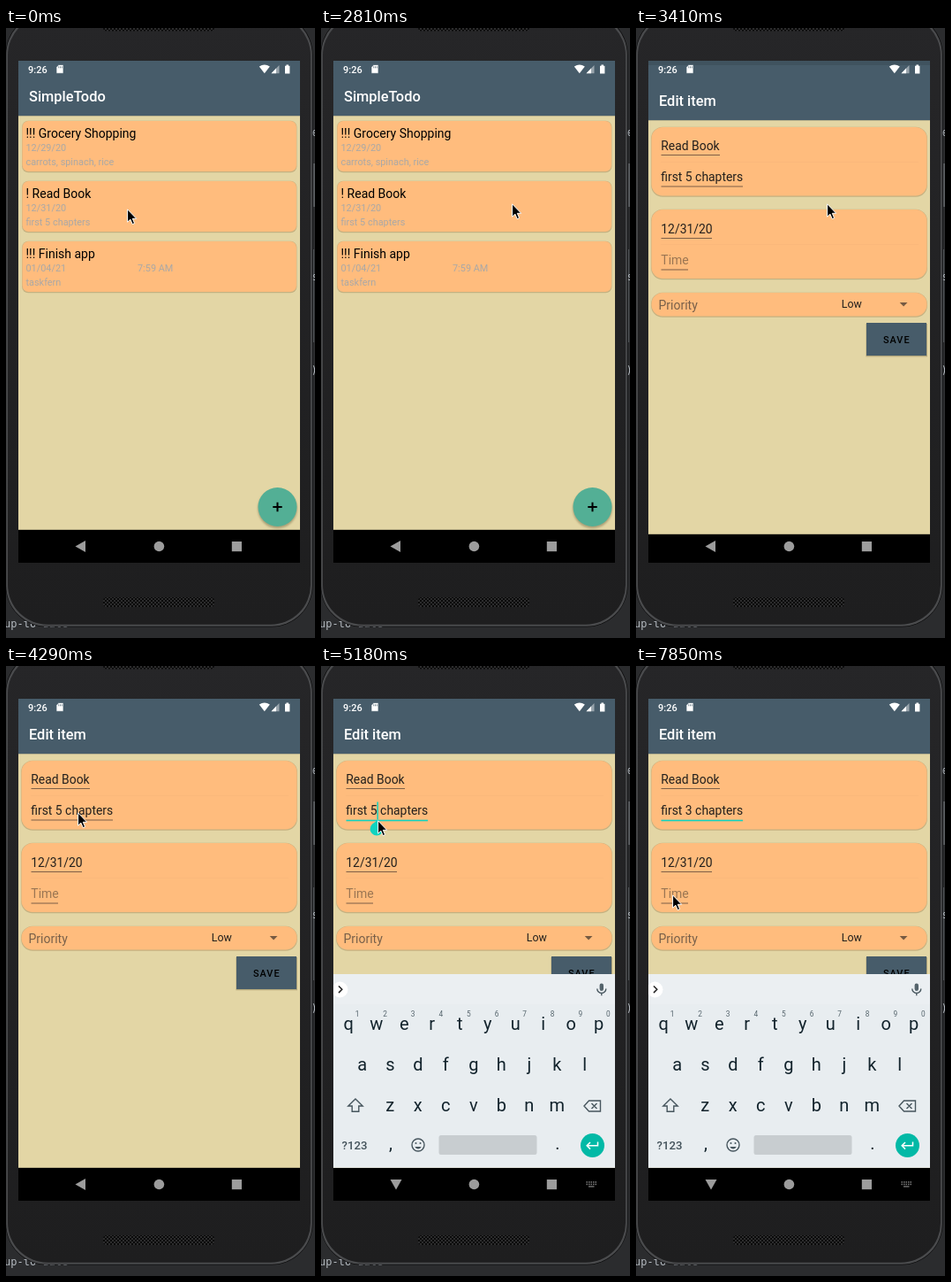
Animation of 350x689 px, one loop 8000 ms. Source, as an HTML page:

```html
<!DOCTYPE html>
<html lang="en">
<head>
<meta charset="utf-8">
<title>Todo app demo</title>
<style>
  html, body { margin: 0; width: 100%; height: 100%; overflow: hidden; background: #2b2c2e; }
  svg { display: block; width: 350px; height: 689px; }
  text { font-family: Roboto, "Noto Sans", sans-serif; white-space: pre; }
  .code { font-family: "DejaVu Sans Mono", "Noto Sans Mono", monospace; font-size: 12px; fill: #b4bac0; }
  .title { font-size: 16.4px; font-weight: 500; fill: #fff; }
  .item { font-size: 14px; fill: #000; }
  .note { font-size: 10.9px; fill: #aaa8a6; }
  .field { font-size: 13.9px; fill: #23201d; }
  .hint { font-size: 14px; fill: #9b7653; }
  .key { font-size: 20px; fill: #12232c; text-anchor: middle; }
  .num { font-size: 8.3px; fill: #55646c; text-anchor: middle; }
  .line { fill: none; stroke: #47565e; stroke-width: 1.4; }
</style>
</head>
<body>
<svg id="stage" viewBox="0 0 350 689" xmlns="http://www.w3.org/2000/svg"></svg>
<script>
const LOOP = 8000;
const SLATE = '#475c6a', SAND = '#e3d6a5', PEACH = '#ffbc7d', TEAL = '#0fd3c0';
const NAV_TOP = 566.8;

const rect = (x, y, w, h, fill, more = '') =>
  `<rect x="${x}" y="${y}" width="${w}" height="${h}" fill="${fill}" ${more}/>`;
const text = (x, y, cls, s, more = '') =>
  `<text x="${x}" y="${y}" class="${cls}" ${more}>${s}</text>`;
const path = (d, more) => `<path d="${d}" ${more}/>`;
const circle = (x, y, r, fill, more = '') =>
  `<circle cx="${x}" cy="${y}" r="${r}" fill="${fill}" ${more}/>`;
const group = (id, body, more = '') => `<g id="${id}" ${more}>${body}</g>`;

const card = (x, y, w, h, r) =>
  rect(x - .4, y - .2, w + .8, h + 1.4, '#8a6a3a', `rx="${r}" opacity=".35"`) +
  rect(x, y, w, h, PEACH, `rx="${r}"`);
const underline = (y, x2) => rect(28.5, y, x2 - 28.5, 1, '#7d6048');

function phone() {
  return rect(0, 0, 350, 689, '#2b2c2e') +
    rect(348, 153, 2, 49, '#55585b') + rect(348, 250, 1, 105, '#55585b') +
    text(346.5, 122, 'code', 'e') + text(346.5, 285, 'code', 's') + text(345.5, 391, 'code', ')') +
    text(-2, 677, 'code', 'up-to-date') +
    rect(-.5, -17, 348, 693.5, '#0d0d0e', 'rx="47"') +
    rect(.2, -16, 346.6, 691.8, '#4a4b4d', 'rx="46"') +
    rect(2, -14, 343, 687.8, 'url(#face)', 'rx="45"') +
    rect(110, -8, 126, 11.5, 'url(#grill)', 'rx="4"') +
    rect(110, 643, 126, 11, 'url(#grill)', 'rx="4"') +
    rect(14, 37, 319, 567, '#000');
}

function header(title) {
  return rect(14, 37, 319, NAV_TOP - 37, SAND) + rect(14, 99, 319, 1, '#b9b28e') +
    rect(14, 37, 319, 62, SLATE) + text(26, 83.3, 'title', title);
}

function listItem(y, title, date, note, time = '') {
  return card(18.5, y, 310.5, 57, 7) +
    text(22.5, y + 18.8, 'item', title) + text(22.5, y + 34.3, 'note', date) +
    text(149, y + 34.3, 'note', time) + text(22.5, y + 49.6, 'note', note);
}

function listPage() {
  return header('SimpleTodo') +
    listItem(105, '!!! Grocery Shopping', '12/29/20', 'carrots, spinach, rice') +
    listItem(173, '! Read Book', '12/31/20', 'first 5 chapters') +
    listItem(241, '!!! Finish app', '01/04/21', 'taskfern', '7:59 AM') +
    circle(307.5, 543, 22.3, '#6b6240', 'opacity=".45" filter="url(#soft)"') +
    circle(307.5, 541, 22, '#53af95') +
    path('M302.3 541h10.4M307.5 535.8v10.4', 'stroke="#000" stroke-width="2"');
}

function editPage() {
  const divider = y => rect(28, y, 292, 1, '#000', 'opacity=".02"');
  return header('Edit item') +
    card(17.5, 107, 312, 77.5, 13) + divider(146) +
    card(17.5, 200, 312, 78, 13) + divider(239) +
    card(17.5, 294, 312, 26.5, 13) +
    text(28.3, 133, 'field', 'Read Book') + underline(138, 95) +
    text(28.3, 168.3, 'field', '', 'id="detail"') +
    group('plain', underline(173.5, 121)) +
    group('focus', rect(28.5, 173.7, 92.5, 1.6, TEAL)) +
    text(28.3, 226.6, 'field', '12/31/20') + underline(232, 86) +
    text(28.3, 262.3, 'hint', 'Time') + underline(267.5, 59) +
    text(25.5, 312.6, 'hint', 'Priority', 'style="fill:#78604a"') +
    text(232.8, 311.4, 'field', 'Low', 'style="font-size:12.4px"') +
    path('M298.7 305h8.8l-4.4 4.4z', 'fill="#755a42"') +
    rect(260.5, 329, 69.5, 37.3, '#6b6240', 'opacity=".4"') +
    rect(261, 328, 68, 37, SLATE) +
    text(280, 350.6, 'item', 'SAVE', 'style="font-size:10.9px;font-weight:500;letter-spacing:.97px"') +
    rect(0, 153.5, 1.5, 20, TEAL, 'id="caret"') +
    group('handle', path('M63.4 174.5l5 4.2a7.5 7.5 0 1 1-10.6 0z', `fill="${TEAL}"`));
}

function keyboard() {
  const row = (keys, x, y) => [...keys].map((k, i) => text(x + i * 31.5, y, 'key', k)).join('');
  const digits = [...'1234567890'].map((n, i) => text(41 + i * 31.6, 396, 'num', n)).join('');
  return rect(14, 348, 319, 219, '#e8edf0') + rect(14, 348, 319, 34, '#ebeff2') +
    circle(21.5, 365.5, 9, '#fff') +
    path('M20 361.5l3.8 3.8-3.8 3.8', 'fill="none" stroke="#222" stroke-width="1.5"') +
    rect(315.6, 358.5, 4.4, 8.5, '#55646c', 'rx="2.2"') +
    path('M312.8 364.5a5 5 0 0 0 10 0M317.8 369.5v2.8', 'class="line"') +
    row('qwertyuiop', 31.2, 411) + digits +
    row('asdfghjkl', 46.8, 457) + row('zxcvbnm', 78.3, 503) +
    path('M39 489l8.2 8h-4.4v6.2h-7.6v-6.2h-4.4z', 'class="line"') +
    path('M303.5 491h13v12h-13l-5.5-6zM306.5 494l6 6m0-6l-6 6', 'class="line"') +
    text(23.5, 545.8, 'field', '?123', 'style="font-size:13.2px;font-weight:500;fill:#43525a"') +
    text(79, 546, 'key', ',') + text(268, 546, 'key', '.') +
    circle(110, 541, 7, 'none', 'class="line"') +
    circle(107.5, 539, 1, '#47565e') + circle(112.5, 539, 1, '#47565e') +
    path('M106.3 543a4 4 0 0 0 7.4 0z', 'fill="#47565e"') +
    rect(133.5, 530, 111, 22, '#c8cdd0', 'rx="2.5"') +
    circle(307.5, 541.5, 13.5, '#02b9a6') +
    path('M313.5 537.5v4.3h-12M305 538l-3.8 3.8 3.8 3.8', 'fill="none" stroke="#fff" stroke-width="1.5"');
}

function statusBar() {
  return text(25, 51, 'title', '9:26', 'style="font-size:11px"') +
    path('M59.8 41.5h5.2v9.8h-8v-7zM59.7 43.3v2M61.5 43.3v2M63.3 43.3v2',
      `fill="#fff" stroke="${SLATE}" stroke-width=".7"`) +
    path('M286.8 43.6q6-4.2 12 0l-6 7.6z', 'fill="#fff"') +
    path('M309.5 42v9.2h-9z', 'fill="#fff" opacity=".45"') +
    path('M306 45.6v5.6h-5.5z', 'fill="#fff"') +
    path('M316 42.8h1.4v-1.2h2.6v1.2h1.4v8.6H316z', 'fill="#fff"');
}

function navBar() {
  const dots = Array.from({ length: 10 }, (_, i) =>
    rect(300.5 + (i % 5) * 2.5, 582.2 + (i > 4) * 2.5, 1.5, 1.5, '#fff')).join('');
  return group('backLeft', path('M78.5 585.5l11.5-6.5v13z', '')) +
    group('backDown', path('M78.5 580h13l-6.5 11.5z', '') +
      group('switch', dots + rect(303, 587.3, 6.5, 1.3, '#fff'), 'opacity=".8"')) +
    circle(173.4, 585.5, 5.8, '#fff') + rect(255.8, 580, 11.2, 11.2, '#fff');
}

const stage = document.getElementById('stage');
stage.innerHTML = `<defs>
  <linearGradient id="face" x2="0" y2="1"><stop stop-color="#262628"/><stop offset="1" stop-color="#1e1e1f"/></linearGradient>
  <pattern id="grill" width="4" height="4" patternUnits="userSpaceOnUse">
    ${rect(0, 0, 4, 4, '#0a0a0a') + rect(0, 0, 2, 2, '#2c2c2d') + rect(2, 2, 2, 2, '#2c2c2d')}</pattern>
  <filter id="soft"><feGaussianBlur stdDeviation="1.3"/></filter>
  <clipPath id="screen">${rect(14, 37, 319, 567, '#000')}</clipPath>
  <clipPath id="reveal">${rect(14, 37, 319, 567, '#000', 'id="revealBox"')}</clipPath>
  <clipPath id="keys">${rect(14, 348, 319, NAV_TOP - 348, '#000')}</clipPath>
</defs>` + phone() +
  group('app', group('list', listPage()) +
    rect(14, 37, 319, NAV_TOP - 37, '#000', 'id="dim" opacity=".1"') +
    group('editWindow', group('edit', editPage()), 'clip-path="url(#reveal)"') +
    group('ime', group('keyboard', keyboard()), 'clip-path="url(#keys)"') +
    statusBar() + group('nav', navBar(), 'fill="#fff" opacity=".61"'), 'clip-path="url(#screen)"') +
  group('cursor', path('M.6 .8v14.4l3.3-3 2.3 5.4 2.4-1-2.3-5.3h4.4z',
    'fill="#000" stroke="#fff" stroke-width="1" stroke-linejoin="round"'));

// time, tip x, tip y
const CURSOR = [
  [0, 137, 204], [600, 136, 205], [740, 134, 207], [890, 133, 208],
  [1480, 127, 209], [1630, 120, 209],
  [2080, 122, 209], [2230, 134, 215], [2380, 168, 221], [2520, 208, 217], [2670, 227, 206], [2810, 216, 198],
  [4150, 150, 180], [4290, 81, 165], [4440, 66, 172], [4590, 64, 174],
  [5330, 283, 522], [5480, 263, 355],
  [5920, 228, 339], [6070, 182, 318], [6220, 160, 308], [6370, 153, 305],
  [6660, 146, 292], [6810, 135, 276], [6960, 115, 267], [7110, 92, 261], [7260, 74, 259], [7410, 66, 258],
  [7710, 52, 258], [7850, 41, 258]
];
// time, edit page offset, top of its visible part, list offset
const SLIDE = [[3260, 18, 185, -3], [3410, 5, 37, -6], [3550, 2, 37, -6], [3700, 1, 37, -6], [3850, 0, 37, -6]];
// time, keyboard offset, opacity
const RISE = [[4740, 60, .55], [4880, 14, .92], [5030, 0, 1]];
// time, text
const TYPED = [[0, 'first 5 chapters'], [6070, 'first  chapters'], [6220, 'first 3 chapters']];
// time, caret x (0 = hidden)
const CARET = [[0, 0], [4590, 63.4], [5330, 0], [5920, 63.4], [6070, 56.2], [6220, 63.4],
  [6810, 0], [7260, 63.4], [7710, 0]];

const el = id => document.getElementById(id);
const at = (table, t) => table.findLast(step => step[0] <= t);
const show = (id, on) => el(id).setAttribute('visibility', on ? 'visible' : 'hidden');
const move = (id, x, y) => el(id).setAttribute('transform', `translate(${x} ${y})`);

function draw(t) {
  const [, x, y] = at(CURSOR, t);
  move('cursor', x, y);

  const slide = at(SLIDE, t);
  show('edit', slide);
  show('dim', slide);
  move('list', 0, slide ? slide[3] : 0);
  if (slide) {
    move('edit', 0, slide[1]);
    el('revealBox').setAttribute('y', slide[2]);
  }

  const rise = at(RISE, t);
  show('keyboard', rise);
  show('backDown', rise);
  show('backLeft', !rise);
  if (rise) {
    move('keyboard', 0, rise[1]);
    el('keyboard').setAttribute('opacity', rise[2]);
  }

  const focused = t >= 4590, caretX = at(CARET, t)[1];
  el('detail').textContent = at(TYPED, t)[1];
  show('focus', focused);
  show('plain', slide && !focused);
  show('handle', focused && t < 6070);
  show('caret', caretX);
  el('caret').setAttribute('x', caretX);
}

const start = performance.now();
function tick() {
  draw((performance.now() - start) % LOOP);
  requestAnimationFrame(tick);
}
tick();
</script>
</body>
</html>
```
